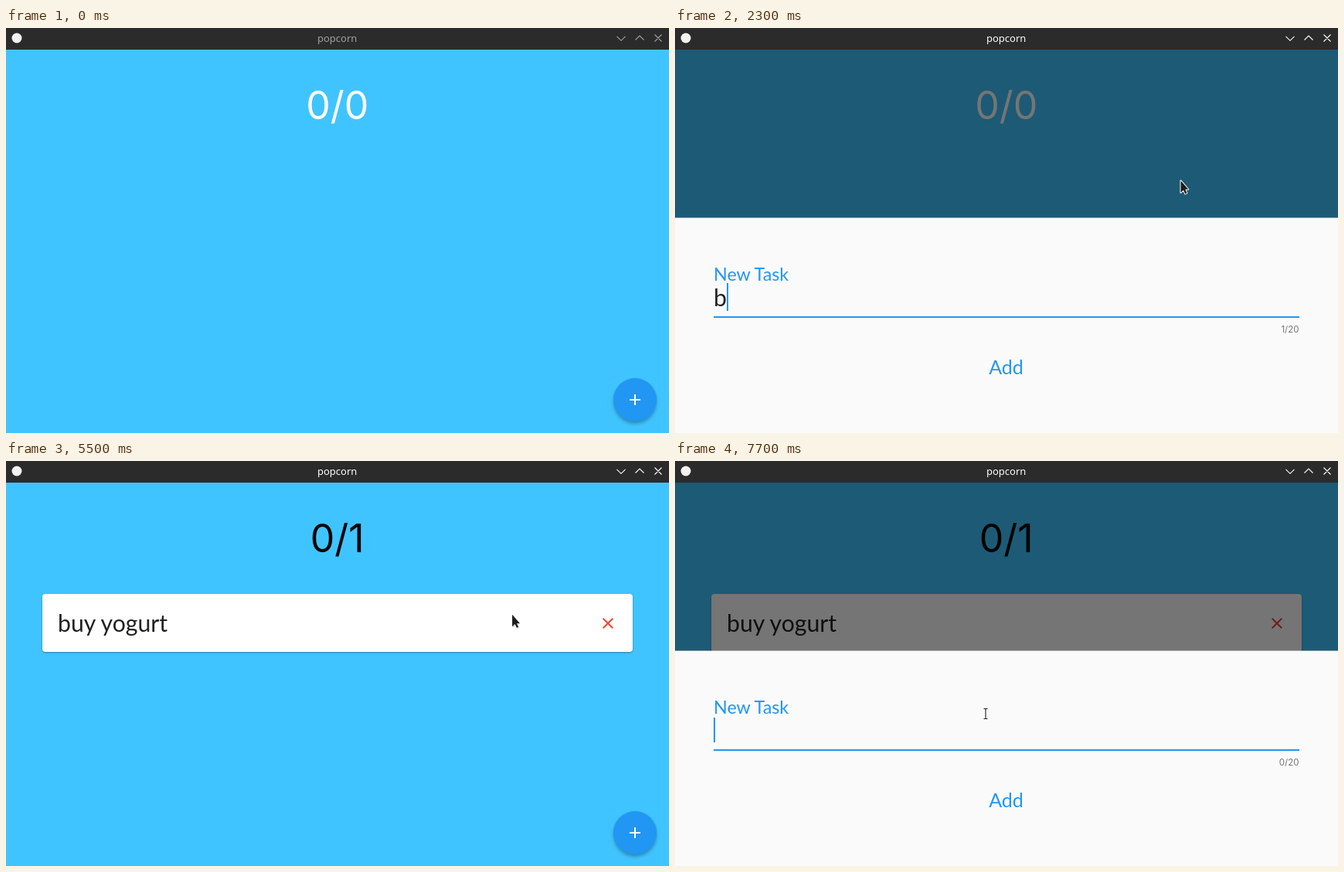
Recreate the animation shown at these times as an HTML page. Size 858x524 px, loop 8000 ms.

```html
<!DOCTYPE html>
<html lang="en">
<head>
<meta charset="utf-8">
<title>popcorn</title>
<style>
  html, body { margin: 0; width: 100%; height: 100%; overflow: hidden; background: #40c4ff; }
  svg { display: block; width: 858px; height: 524px; }
  .lato { font-family: Lato, "Noto Sans", sans-serif; }
  .inter { font-family: Inter, "Noto Sans", sans-serif; }
  .noto { font-family: "Noto Sans", "Open Sans", sans-serif; }
  text { white-space: pre; }
</style>
</head>
<body>
<svg viewBox="0 0 858 524">
  <defs>
    <filter id="soft" x="-30%" y="-30%" width="160%" height="160%"><feGaussianBlur stdDeviation="2.6"/></filter>
    <filter id="thin" x="-5%" y="-10%" width="110%" height="120%"><feGaussianBlur stdDeviation="0.8"/></filter>
    <clipPath id="itemClip"><rect x="60" y="190" width="640" height="37"/></clipPath>
  </defs>

  <rect width="858" height="524" fill="#40c4ff"/>
  <text id="score" class="inter" x="428.7" y="117.5" font-size="50" text-anchor="middle"></text>

  <g id="card">
    <rect x="47" y="173" width="764" height="75" rx="4" opacity=".35" filter="url(#thin)"/>
    <rect x="47" y="172" width="764" height="75" rx="4" fill="#fff"/>
    <text class="lato" x="67" y="221.3" font-size="30.2" fill="#212121" clip-path="url(#itemClip)">buy yogurt</text>
    <path d="M772.7 203.7l12.6 12.6m0-12.6l-12.6 12.6" stroke="#f44336" stroke-width="2"/>
  </g>

  <circle cx="814" cy="484" r="27.5" opacity=".32" filter="url(#soft)"/>
  <circle cx="814" cy="481" r="28" fill="#2196f3"/>
  <path d="M807 481h14m-7-7v14" stroke="#fff" stroke-width="2"/>

  <rect id="barrier" y="28" width="858" height="496"/>

  <g id="sheet">
    <rect width="858" height="290" fill="#fafafa"/>
    <text id="label" class="lato" font-size="31">New Task</text>
    <text id="typed" class="lato" x="50" y="114" font-size="30.2" fill="#212121"></text>
    <rect id="caret" width="2" fill="#2196f3"/>
    <path id="line" d="M50 128.5H808"/>
    <text id="count" class="inter" x="807.5" y="148.5" font-size="11.5" text-anchor="end" fill="#757575"></text>
    <text class="lato" x="428.5" y="202.5" font-size="25" text-anchor="middle" fill="#2196f3">Add</text>
  </g>

  <rect width="858" height="28" fill="#2b2b2b"/>
  <circle cx="14" cy="13" r="6.5" fill="#f2f2f2"/>
  <text id="title" class="noto" x="428.7" y="18" font-size="13" text-anchor="middle">popcorn</text>
  <path id="buttons" fill="none" stroke-width="1.1"
    d="M790.5 10.8l5.5 5.5 5.5-5.5M814.5 15.5l5.5-5.5 5.5 5.5M839.5 8.5l9 9m0-9l-9 9"/>

  <g id="pointer">
    <g id="arrow" stroke-linejoin="round">
      <path d="M1 1V17L4.6 13.6 7 18.5 9 17.6 6.8 12.6H10.5Z" opacity=".18"/>
      <path id="arrowBody" d="M0 0V15.5L3.5 12.2 5.8 17.2 8 16.2 5.8 11.3H9.8Z"
        fill="#1c1c1c" stroke="#fff" stroke-width="2" paint-order="stroke"/>
    </g>
    <g id="beam" fill="none">
      <path d="M-2.5-6.5h5M0-6.5v13M-2.5 6.5h5" stroke="#fff" stroke-width="3"/>
      <path d="M-2.5-6.5h5M0-6.5v13M-2.5 6.5h5" stroke="#1c1c1c" stroke-width="1.1"/>
    </g>
  </g>
</svg>

<script>
const LOOP = 8000, TASK = 'buy yogurt', REST_TOP = 245.5;
const el = {};
document.querySelectorAll('[id]').forEach(n => el[n.id] = n);

const clamp = v => Math.min(1, Math.max(0, v));
const mix = (a, b, k) => a + (b - a) * k;
const smooth = k => k * k * (3 - 2 * k);
const mixRgb = (a, b, k) => `rgb(${a.map((v, i) => Math.round(mix(v, b[i], k)))})`;
const set = (node, attrs) => { for (const k in attrs) node.setAttribute(k, attrs[k]); };
const show = (node, on) => node.setAttribute('visibility', on ? 'inherit' : 'hidden');

function bezier(x1, y1, x2, y2) {
  const at = (a, b, s) => 3 * a * s * (1 - s) ** 2 + 3 * b * s * s * (1 - s) + s ** 3;
  return x => {
    let lo = 0, hi = 1;
    for (let i = 0; i < 30; i++) {
      const mid = (lo + hi) / 2;
      if (at(x1, x2, mid) < x) lo = mid; else hi = mid;
    }
    return at(y1, y2, (lo + hi) / 2);
  };
}
const decelerate = bezier(0, 0, .2, 1);
const ease = bezier(.25, .1, .25, 1);
const fastOutSlowIn = bezier(.4, 0, .2, 1);

const SUBMIT = 4770, OPEN = [667, 6367], FOCUS = [1480, 7510];

// time, characters typed, caret x
const KEYS = [
  [2290, 1, 67], [2590, 3, 97.5], [2790, 4, 105], [3090, 5, 119.5], [3190, 6, 136],
  [3490, 7, 153], [3590, 8, 170], [3790, 9, 181], [3890, 10, 192]
];

// time, x, y
const PATH = [
  [290, 848, 520], [540, 814, 485], [680, 807, 481], [900, 761, 451], [1100, 724, 383],
  [1250, 706, 352], [1480, 704, 349], [1930, 654.5, 197.5], [5470, 654.5, 197.5],
  [6310, 806, 482], [6600, 806, 482], [7200, 655, 360], [7390, 402, 327], [8000, 402, 327]
];

function pointerAt(t) {
  let i = PATH.findIndex(p => p[0] > t);
  if (i < 1) i = i < 0 ? PATH.length - 1 : 1;
  const [t0, x0, y0] = PATH[i - 1], [t1, x1, y1] = PATH[i];
  const raw = clamp((t - t0) / (t1 - t0));
  const k = t1 - t0 > 400 ? smooth(raw) : raw;
  return [mix(x0, x1, k), mix(y0, y1, k)];
}

function sheetProgress(t) {
  if (t < SUBMIT) return clamp((t - OPEN[0]) / 250);
  if (t < OPEN[1]) return 1 - clamp((t - SUBMIT) / 200);
  return clamp((t - OPEN[1]) / 250);
}

function drawField(t) {
  const second = t >= OPEN[1];
  const focusAt = FOCUS[second ? 1 : 0];
  const key = second ? null : KEYS.filter(k => k[0] <= t).pop();
  const [lastAt, n, caretX] = key || [focusAt, 0, 50];
  const k = fastOutSlowIn(clamp((t - focusAt) / 200));
  const blue = [33, 150, 243];

  set(el.label, {
    transform: `translate(50 ${mix(99.3, 81, k)}) scale(${mix(1, .75, k)})`,
    fill: mixRgb([100, 100, 100], blue, k)
  });
  set(el.line, { stroke: mixRgb([158, 158, 158], blue, k), 'stroke-width': mix(1, 2, k) });
  el.typed.textContent = TASK.slice(0, n);
  el.count.textContent = n + '/20';
  set(el.caret, { x: caretX, y: n ? 84.5 : 86.5, height: n ? 36 : 32 });
  show(el.caret, t >= focusAt && t < SUBMIT + (second ? LOOP : 0) && (t - lastAt) % 1000 < 500);
}

function draw(t) {
  const added = t >= SUBMIT;
  el.score.textContent = added ? '0/1' : '0/0';
  set(el.score, { fill: added ? '#000' : '#fff' });
  show(el.card, added);

  const p = sheetProgress(t);
  const top = mix(524, REST_TOP, decelerate(p));
  const dim = p > 0 ? ease(p) : 0;
  set(el.barrier, { opacity: .54 * dim });
  set(el.sheet, { transform: `translate(0 ${top})` });
  show(el.sheet, p > 0);
  drawField(t);

  const active = mixRgb([160, 160, 160], [252, 252, 252], clamp((t - 560) / 150));
  set(el.title, { fill: active });
  set(el.buttons, { stroke: active });

  const [x, y] = pointerAt(t);
  const overField = p > 0 && x > 50 && x < 808 && y > top + 60 && y < top + 150;
  set(el.pointer, { transform: `translate(${x} ${y})` });
  show(el.pointer, t >= PATH[0][0]);
  show(el.arrow, !overField);
  show(el.beam, overField);
  set(el.arrowBody, { 'stroke-opacity': dim });
}

const start = performance.now();
function tick() {
  draw((performance.now() - start) % LOOP);
  requestAnimationFrame(tick);
}
tick();
</script>
</body>
</html>
```
